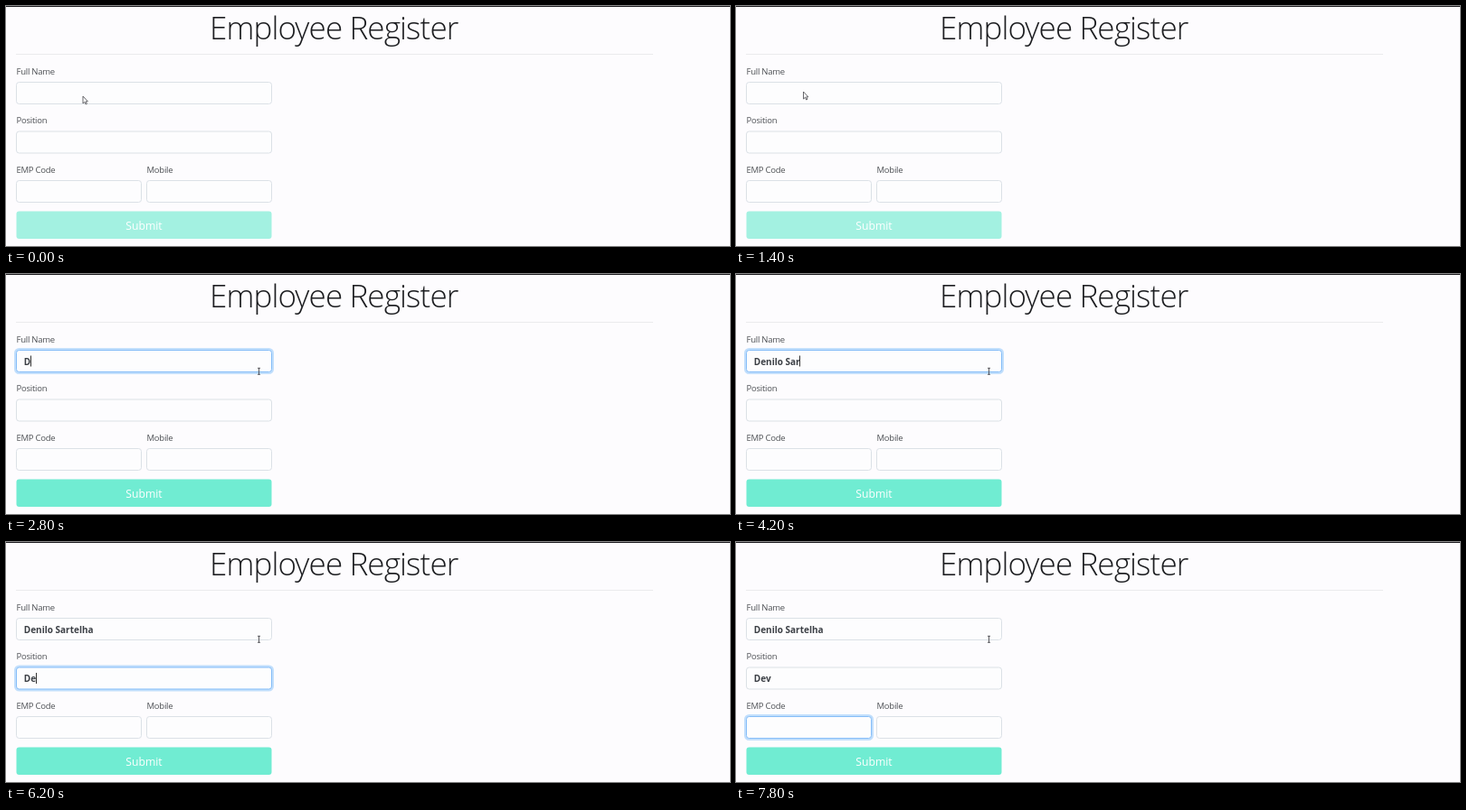
An HTML page for the animation above (8 s loop, 800x266 px).

```html
<!DOCTYPE html>
<html lang="en">
<head>
<meta charset="utf-8">
<title>Employee Register</title>
<style>
  html, body { margin: 0; width: 100%; height: 100%; overflow: hidden; background: #fdfcfe; }
  svg { display: block; width: 100%; height: 100%; }
  text { font-family: "Open Sans", "Noto Sans", sans-serif; white-space: pre; }
  .title { font-size: 35px; font-weight: 300; letter-spacing: -.88px; fill: #1c1d20; }
  .label { font-size: 9.5px; letter-spacing: -.25px; fill: #4d5054; }
  .value { font-size: 10px; font-weight: 700; fill: #3b3f45; }
  .submit { font-size: 12.2px; fill: #fff; text-anchor: middle; }
  .box { fill: #fdfdfe; stroke: #dbe1e6; }
  .ring { fill: none; stroke: #c2dffc; stroke-width: 3; visibility: hidden; }
  .caret { stroke: #333; visibility: hidden; }
  .focus .ring { visibility: visible; }
  .focus .box { stroke: #85bdf8; }
  .focus.blink .caret { visibility: visible; }
</style>
</head>
<body>
<svg viewBox="0 0 800 266">
  <rect width="800" height="266" fill="#fdfcfe"/>
  <rect width="800" height="1" fill="#1d1c20"/>
  <text class="title" x="225" y="37">Employee Register</text>
  <path d="M11 53.5H715" stroke="#ebebed"/>
  <g id="form"></g>
  <rect id="button" x="11.5" y="227.5" width="282" height="30.5" rx="3"/>
  <text class="submit" x="152.5" y="248">Submit</text>
  <path id="arrow" d="M0 0V8L1.9 6.3L3.2 9L4.4 8.4L3.2 5.8H5.4Z" fill="#fff" stroke="#45454a" stroke-width=".8"/>
  <path id="beam" d="M-1.5-3.5H1.5M0-3.5V3.5M-1.5 3.5H1.5" fill="none" stroke="#4a4a4e" stroke-width=".9"/>
</svg>
<script>
const LOOP = 8000, STEP = 200;
const NAME = "Denilo Sartelha", POSITION = "Dev";
const byId = id => document.getElementById(id);

function addField(label, x, y, width) {
  const group = document.createElementNS("http://www.w3.org/2000/svg", "g");
  group.innerHTML = `
    <text class="label" x="${x}" y="${y - 9}">${label}</text>
    <rect class="ring" x="${x - 1}" y="${y - 1}" width="${width + 2}" height="26" rx="4"/>
    <rect class="box" x="${x}" y="${y}" width="${width}" height="24" rx="3"/>
    <text class="value" x="${x + 8.3}" y="${y + 16.2}"></text>
    <path class="caret" d="M0 ${y + 6}v12"/>`;
  byId("form").append(group);
  return { group, x: x + 8.5, value: group.querySelector(".value"), caret: group.querySelector(".caret") };
}

const fields = [
  addField("Full Name", 11.5, 84.5, 282),
  addField("Position", 11.5, 139, 282),
  addField("EMP Code", 11.5, 193.5, 138),
  addField("Mobile", 155.5, 193.5, 138)
];

// Each entry: start time, then the value held from there on.
const nameLength = [[0, 0], [2800, 1], [3400, 2], [3800, 4], [4000, 7], [4200, 10], [4400, 12], [4600, 14], [4800, 15]];
const positionLength = [[0, 0], [6000, 1], [6200, 2], [6400, 3]];
const focused = [[0, -1], [2600, 0], [5200, 1], [7000, 2]];
const caretOn = [[0, 0], [2600, 1], [3200, 0], [3400, 1], [5000, 0], [5200, 1], [5800, 0], [6000, 1], [7600, 0]];
const pointer = [[0, 85, 100], [400, 96, 104], [900, 86, 101], [1400, 74.5, 95], [1800, 130, 100], [2400, 279.5, 107.8]];

const held = (track, t) => track.findLast(entry => entry[0] <= t)[1];

function pointerAt(t) {
  const next = pointer.findIndex(p => p[0] > t);
  if (next < 0) return pointer.at(-1).slice(1);
  const a = pointer[next - 1], b = pointer[next];
  const u = (t - a[0]) / (b[0] - a[0]), ease = u * u * (3 - 2 * u);
  return [1, 2].map(i => a[i] + (b[i] - a[i]) * ease);
}

function setValue(field, text) {
  if (field.value.textContent !== text) field.value.textContent = text;
  const x = Math.floor(field.x + (text ? field.value.getComputedTextLength() : 0)) + .5;
  field.caret.setAttribute("transform", `translate(${x})`);
}

function draw(now) {
  const t = Math.floor(now % LOOP / STEP) * STEP;
  setValue(fields[0], NAME.slice(0, held(nameLength, t)));
  setValue(fields[1], POSITION.slice(0, held(positionLength, t)));
  setValue(fields[2], "");
  fields.forEach((field, i) => {
    field.group.classList.toggle("focus", i === held(focused, t));
    field.group.classList.toggle("blink", !!held(caretOn, t));
  });
  byId("button").setAttribute("fill", t < 2800 ? "#a3f1e1" : "#70ecd2");
  const place = `translate(${pointerAt(t)})`, typing = t >= 2200;
  byId("arrow").setAttribute("transform", place);
  byId("beam").setAttribute("transform", place);
  byId("arrow").style.display = typing ? "none" : "";
  byId("beam").style.display = typing ? "" : "none";
}

function tick(now) {
  draw(now);
  requestAnimationFrame(tick);
}
draw(0);
requestAnimationFrame(tick);
</script>
</body>
</html>
```
